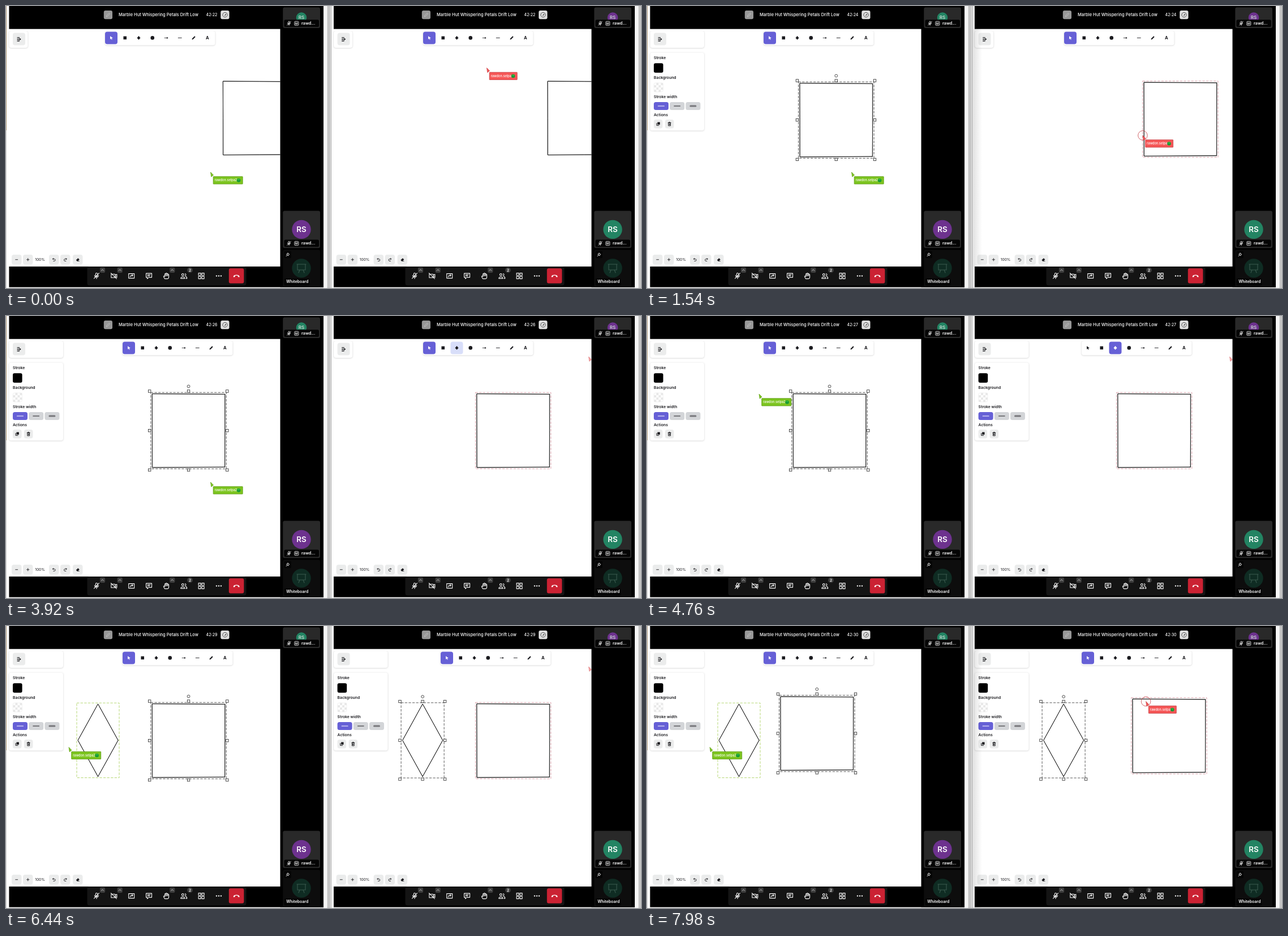
Recreate the animation shown at these times as an HTML page with a canvas. Size 1122 by 499 pixels, loop 8000 ms.

```html
<!DOCTYPE html>
<html lang="en">
<head>
<meta charset="utf-8">
<title>Shared whiteboard</title>
<style>
html, body { margin: 0; width: 100%; height: 100%; overflow: hidden; background: #fff; }
canvas { display: block; width: 1122px; height: 499px; }
</style>
</head>
<body>
<canvas id="stage"></canvas>
<script>
const W = 1122, H = 499, LOOP = 8000, STEP = 70, LAG = 140;
const canvas = document.getElementById('stage');
const ctx = canvas.getContext('2d');
const dpr = window.devicePixelRatio || 1;
canvas.width = W * dpr;
canvas.height = H * dpr;

const FONT = 'Inter, "Open Sans", sans-serif';
const TITLE = 'Marble Hut Whispering Petals Drift Low';
const USER = 'rawdon.selpa';
const INK = '#1b1b1f', ACCENT = '#6660d6', SOFT = '#ebecec';
const RED = { fill: '#f55656', edge: '#c63f46' };
const GREEN = { fill: '#7cc41f', edge: '#5f9c17' };
const PURPLE_AVATAR = '#6d328e', GREEN_AVATAR = '#238463';
const TICKS = [210, 1190, 2200, 3220, 4270, 5300, 6230, 7210];

// Two browser windows: offsets of board, centred bars and tiles
const LEFT = { ox: 0, bar: 0, tile: 0, edge: 484.5, end: 561, big: PURPLE_AVATAR, small: GREEN_AVATAR };
const RIGHT = { ox: 573.6, bar: 562, tile: 550, edge: 1034.5, end: 1111, big: GREEN_AVATAR, small: PURPLE_AVATAR };

const RECT_W = 128.5, RECT_H = 130.5;
const RECT_PATH = [
  [0, 383.5, 133], [770, 383.5, 133], [1400, 304.5, 135], [1540, 270, 136.5],
  [1680, 232, 137], [1960, 300, 136], [2240, 258.3, 137.5], [7350, 258.3, 137.5],
  [7630, 310, 131], [7840, 284.5, 129], [7980, 236, 124.8]
];
const RED_PATH = [
  [0, 849.5, 109.5], [350, 955, 227.5], [2450, 829.8, 232], [2520, 835, 232],
  [2730, 841, 187], [2940, 1029.5, 72], [7210, 1029.5, 72], [7420, 855.8, 142.5]
];
const GREEN_PATH = [
  [0, 361.5, 294], [4550, 361.5, 294], [4690, 198, 138], [4830, 198, 138],
  [5320, 127, 266.5], [6160, 127, 266.5], [6440, 111, 214.5]
];

function along(path, t) {
  let i = path.findIndex(k => k[0] > t);
  if (i < 0) i = path.length;
  const a = path[Math.max(0, i - 1)], b = path[Math.min(i, path.length - 1)];
  const p = b[0] > a[0] ? Math.max(0, (t - a[0]) / (b[0] - a[0])) : 0;
  return { x: a[1] + (b[1] - a[1]) * p, y: a[2] + (b[2] - a[2]) * p };
}

const between = (t, a, b) => t >= a && t < b;

// ---- drawing helpers ----
function fill(x, y, w, h, color) {
  ctx.fillStyle = color;
  ctx.fillRect(x, y, w, h);
}

function box(x, y, w, h, r, color, stroke) {
  ctx.beginPath();
  ctx.roundRect(x, y, w, h, r);
  if (color) { ctx.fillStyle = color; ctx.fill(); }
  if (stroke) { ctx.strokeStyle = stroke; ctx.lineWidth = 0.8; ctx.stroke(); }
}

function disc(x, y, r, color, stroke) {
  ctx.beginPath();
  ctx.arc(x, y, r, 0, Math.PI * 2);
  if (color) { ctx.fillStyle = color; ctx.fill(); }
  if (stroke) { ctx.strokeStyle = stroke; ctx.lineWidth = 0.8; ctx.stroke(); }
}

function text(s, x, y, size, weight, color, align = 'left') {
  ctx.font = `${weight} ${size}px ${FONT}`;
  ctx.textAlign = align;
  ctx.textBaseline = 'middle';
  ctx.fillStyle = color;
  ctx.fillText(s, x, y);
}

// SVG path centred on x, y; no line width means filled
function icon(d, x, y, color, width) {
  ctx.save();
  ctx.translate(x, y);
  const p = new Path2D(d);
  if (width) {
    ctx.strokeStyle = color;
    ctx.lineWidth = width;
    ctx.lineCap = ctx.lineJoin = 'round';
    ctx.stroke(p);
  } else {
    ctx.fillStyle = color;
    ctx.fill(p);
  }
  ctx.restore();
}

function island(x, y, w, h) {
  ctx.save();
  ctx.shadowColor = 'rgba(0,0,0,.2)';
  ctx.shadowBlur = 2.5;
  ctx.shadowOffsetY = 0.5;
  box(x, y, w, h, 4, '#fff');
  ctx.restore();
}

const ICON = {
  mic: 'M-1.6-3.6a1.6 1.6 0 0 1 3.2 0v3a1.6 1.6 0 0 1-3.2 0zM-3.4-1a3.4 3.4 0 0 0 6.8 0M0 2.6V5M-4.5 4.5L4.5-5',
  cam: 'M-5-3.2H2V3.2H-5zM2-.8L5-2.8V2.8L2 .8M-5.5-5L4.5 5',
  share: 'M-5-4H5V4H-5zM-2.5 1.8C-2-.8 0-1 2.5-1M1-2.6L2.6-1 1 .6',
  chat: 'M-5-4.5H5V2.5H0L-3 5V2.5H-5zM-2.5-2H2.5M-2.5 0H1',
  hand: 'M-3 5C-4 3-5.5 1.5-5 .6S-3.5.2-2.8 1.4V-3C-2.8-4.4-1-4.4-1-3V-4C-1-5.4.8-5.4.8-4V-3.4C.8-4.7 2.5-4.7 2.5-3.4V-2C2.5-3.2 4.2-3.2 4.2-2V2C4.2 4 3 5 2 5zM-1-3V0M.8-3.5V0M2.5-2V0',
  people: 'M-3.8-2.2a1.9 1.9 0 1 0 3.8 0a1.9 1.9 0 1 0-3.8 0M-5.5 4.5C-5.5 .6 1.7 .6 1.7 4.5zM2-3.9a1.7 1.7 0 0 1 0 3.4M3 1C5 1.4 5.5 3 5.5 4.5H3.7',
  grid: 'M-5-5H-.9V-.9H-5zM.9-5H5V-.9H.9zM-5 .9H-.9V5H-5zM.9 .9H5V5H.9z',
  phone: 'M-5.4 1.6C-6-3 6-3 5.4 1.6C5.2 2.6 2.6 2 2.4 1.2V-.3C1-.8-1-.8-2.4-.3V1.2C-2.6 2-5.2 2.6-5.4 1.6z',
  pen: 'M-3 3L-2.5 1 1.7-3.2 3.2-1.7-1 2.5z',
  caret: 'M-2 .9L0-1.1 2 .9',
  undo: 'M-1-2.6L-2.4-1.2-1 .2M-2.3-1.2H.4a1.9 1.9 0 0 1 0 3.8H-1',
  redo: 'M1-2.6L2.4-1.2 1 .2M2.3-1.2H-.4a1.9 1.9 0 0 0 0 3.8H1',
  eraser: 'M-3 .7L.4-2.6 3-.2 .4 2.4H-1.5zM-1.5 2.2H3V2.9H-1.5z',
  menu: 'M-3.4-3.6H1V-2.2H-3.4zM-3.4-.7H.2V.7H-3.4zM-3.4 2.2H1V3.6H-3.4zM.7-2.2L3.8 0 .7 2.2z',
  trash: 'M-2.5-2.2H2.5M-1-2.2V-3.2H1V-2.2M-1.9-2V3.3H1.9V-2M-.6-.8V2M.6-.8V2',
  copyFront: 'M-1.2-3.2H3.2V1.2H-1.2z',
  copyBack: 'M-2.6-1.2V2.7H1.4',
  pin: 'M.4-2.9L2.9-.4 1.3 .4 .9 2.1-2.1-.9-.4-1.3zM-.6 .6L-2.8 2.8',
  board: 'M-8-7H8M-7-7V3H7V-7M-3 3L-5 8M3 3L5 8'
};

// Hand-drawn outline: two slightly different passes
function rough(pts) {
  ctx.strokeStyle = '#000';
  ctx.lineWidth = 0.7;
  for (let pass = 0; pass < 2; pass++) {
    ctx.beginPath();
    pts.forEach(([x, y], i) => {
      const [u, v] = pts[(i + 1) % pts.length];
      const k = pass ? 0.6 : -0.2, s = i % 2 ? 1 : -1;
      ctx.moveTo(x + k * 0.6, y - k * s * 0.6);
      ctx.quadraticCurveTo((x + u) / 2 + k * 0.6, (y + v) / 2 + k * 0.5, u - k * s * 0.5, v + k * 0.5);
    });
    ctx.stroke();
  }
}

function dashed(x, y, w, h, color) {
  ctx.save();
  ctx.setLineDash([4.4, 2.2]);
  ctx.strokeStyle = color;
  ctx.lineWidth = 0.8;
  ctx.strokeRect(x, y, w, h);
  ctx.restore();
}

function selection(x, y, w, h) {
  dashed(x - 2.5, y - 2.2, w + 5, h + 4.6, '#333');
  const xs = [x - 4.6, x + w / 2, x + w + 4], ys = [y - 4.5, y + h / 2, y + h + 4.5];
  ctx.lineWidth = 0.8;
  ctx.strokeStyle = '#222';
  for (let i = 0; i < 9; i++) {
    if (i === 4) continue;
    const hx = xs[i % 3], hy = ys[Math.floor(i / 3)];
    fill(hx - 2.2, hy - 2.2, 4.4, 4.4, '#fff');
    ctx.strokeRect(hx - 2.2, hy - 2.2, 4.4, 4.4);
  }
  disc(xs[1], y - 13, 2.4, '#fff', '#222');
}

function drawRect(x, y) {
  rough([[x, y], [x + RECT_W, y + 0.8], [x + RECT_W, y + RECT_H - 0.8], [x, y + RECT_H]]);
}

function diamondBox(t) {
  const c = along(GREEN_PATH, Math.min(t, 5320));
  return { x: c.x, y: 138, w: 198 - c.x, h: c.y - 138 };
}

function drawDiamond({ x, y, w, h }, ox) {
  x += ox;
  rough([[x + w / 2, y], [x + w, y + h / 2], [x + w / 2, y + h], [x, y + h / 2]]);
}

function pointer(p, look, name, width, pressed, faded) {
  ctx.save();
  if (faded) ctx.globalAlpha = 0.55;
  if (pressed) disc(p.x, p.y, 8.3, null, look.edge);
  ctx.translate(p.x, p.y);
  ctx.beginPath();
  ctx.moveTo(0, 0);
  ctx.lineTo(1.2, 8.2);
  ctx.lineTo(5, 5.2);
  ctx.closePath();
  ctx.fillStyle = look.fill;
  ctx.fill();
  ctx.strokeStyle = look.edge;
  ctx.lineWidth = 0.7;
  ctx.lineJoin = 'round';
  ctx.stroke();
  if (!faded) {
    box(4.7, 7.8, width, 13.2, 0.5, look.fill, look.edge);
    text(name, 7.2, 14.6, 5.6, 500, '#fff');
    disc(width - 2.4, 14.5, 3.3, '#169a36');
    fill(width - 4.3, 12.6, 3.8, 1.2, '#3fca45');
  }
  ctx.restore();
}

// ---- window parts ----
function toolbar(x, active, hover) {
  island(x, 44, 194.5, 25.5);
  const at = i => x + 11 + (i ? 24.25 * i : 0);
  if (hover >= 0) box(at(hover) - 11, 45.5, 22, 22, 4, '#d8def9');
  box(at(active) - 11, 45.5, 22, 22, 4, ACCENT);
  const tone = i => i === active ? '#fff' : INK;
  const shapes = [
    'M-2-3.2L2.8 .3 .6 .8 1.8 3 .9 3.4-.3 1.3-1.9 2.7z', 'M-2.8-2.8H2.8V2.8H-2.8z',
    'M0-3.4L3 0 0 3.4-3 0z', 'M-3.3 0a3.3 3.3 0 1 0 6.6 0a3.3 3.3 0 1 0-6.6 0',
    'M-3.3-.4H1.2V-1.9L3.5 0 1.2 1.9V.4H-3.3z', 'M-3.4-.45H3.4V.45H-3.4z', ICON.pen
  ];
  shapes.forEach((d, i) => icon(d, at(i), 56.4, tone(i)));
  text('A', at(7), 56.8, 7.6, 700, INK, 'center');
}

function panel(ox) {
  island(ox + 5.5, 82.5, 95.5, 138);
  [['Stroke', 92], ['Background', 127], ['Stroke width', 161.3], ['Actions', 193]]
    .forEach(([s, y]) => text(s, ox + 12, y, 6.8, 600, INK));
  box(ox + 12, 101.3, 16.6, 16.6, 3, '#000');
  box(ox + 12.3, 136, 16, 16, 3, '#fff', '#eee');
  for (let i = 0; i < 16; i++) {
    const r = Math.floor(i / 4), c = i % 4;
    if ((r + c) % 2) fill(ox + 12.5 + c * 4, 136.2 + r * 4, 3.9, 3.9, '#e8e8e8');
  }
  for (let i = 0; i < 3; i++) {
    const x = ox + 12 + i * 28.2, h = 1 + i;
    box(x, 170, 26, 14, 3.5, i ? '#d3d5d8' : ACCENT);
    box(x + 7, 177 - h / 2, 12, h, h / 2, i ? '#77777b' : '#fff');
  }
  box(ox + 12, 201, 15.5, 15.5, 3.5, SOFT);
  box(ox + 32, 201, 15.5, 15.5, 3.5, SOFT);
  icon(ICON.copyFront, ox + 19.7, 208.7, INK);
  icon(ICON.copyBack, ox + 19.7, 208.7, INK, 1);
  icon(ICON.trash, ox + 39.7, 208.7, INK, 0.9);
}

function boardTools(win, open, active, hover) {
  const { ox } = win;
  island(ox + 5.5, 44, open ? 95.5 : 33, 30);
  box(ox + 12, 47.5, 22, 22, 4, SOFT);
  icon(ICON.menu, ox + 23, 58.8, INK);
  if (open) panel(ox);
  toolbar(win.bar + 175 + (open ? 31 : 0), active, hover);

  [10, 30, 76, 96, 118].forEach(x => box(ox + x, 440, 17.5, 17.5, 4, SOFT));
  icon('M-2 0H2', ox + 18.7, 448.8, INK, 0.9);
  icon('M-2.2 0H2.2M0-2.2V2.2', ox + 38.7, 448.8, INK, 0.9);
  text('100%', ox + 60, 449, 6.6, 400, INK, 'center');
  icon(ICON.undo, ox + 84.8, 448.8, INK, 0.9);
  icon(ICON.redo, ox + 104.8, 448.8, INK, 0.9);
  icon(ICON.eraser, ox + 126.8, 448.8, INK);
}

function header(bar, time) {
  box(bar + 172.8, 8, 15.2, 15.2, 3, '#979797');
  icon(ICON.pen, bar + 180.5, 15.5, '#c6c6c6', 0.8);
  text(TITLE, bar + 199, 15.8, 7.5, 500, '#fff');
  text(time, bar + 353.6, 15.8, 7, 500, '#fff');
  box(bar + 379.3, 8, 15.2, 15.2, 3, '#e0e0e0');
  disc(bar + 387, 15.6, 4.2, null, '#333');
  icon('M0 1.2L1.8-1.4', bar + 386.7, 15.8, '#333', 1.1);
}

function callBar(bar) {
  box(bar + 143.5, 461, 281, 33.5, 4, '#141414');
  ['mic', 'cam', 'share', 'chat', 'hand', 'people', 'grid'].forEach((name, i) =>
    icon(ICON[name], bar + 160 + i * 30.85, 477.6, '#fff', 1.05));
  [-4, 0, 4].forEach(d => disc(bar + 376 + d, 477.6, 1.2, '#fff'));
  [170.5, 201.2, 293.8].forEach(x => {
    box(bar + x - 4.6, 462.7, 9.2, 9.2, 2, '#3d3d3d');
    icon(ICON.caret, bar + x, 467.4, '#ddd', 0.9);
  });
  disc(bar + 325, 467.4, 4.9, '#3d3d3d');
  text('2', bar + 325, 467.7, 6.6, 600, '#fff', 'center');
  box(bar + 393.8, 464.2, 26.6, 26.6, 3, '#cb2233');
  icon(ICON.phone, bar + 407.2, 477.6, '#fff');
}

function nameTag(x, y) {
  box(x + 491.5, y, 61.5, 12.7, 2.5, '#050505');
  ctx.save();
  ctx.translate(x + 500, y + 6.5);
  ctx.scale(0.72, 0.72);
  icon(ICON.mic, 0, 0, '#fff', 1.1);
  ctx.restore();
  box(x + 509.8, y + 3, 7, 7, 1.2, null, '#fff');
  text('M', x + 513.3, y + 6.8, 5, 600, '#fff', 'center');
  text(USER.slice(0, 4) + '...', x + 522, y + 6.3, 7.2, 600, '#fff');
}

function tiles({ tile: x, big, small }) {
  box(x + 489.3, 2.5, 65.7, 36.5, 3, '#292929');
  disc(x + 522, 20.5, 9.3, small);
  text('RS', x + 522, 20.8, 8, 600, '#c9d6d0', 'center');
  nameTag(x, 24.3);

  box(x + 489.3, 362.5, 65.7, 65.7, 3, '#292929');
  disc(x + 522, 395.4, 16.7, big);
  text('RS', x + 522, 396, 13.4, 600, '#fff', 'center');
  nameTag(x, 413.6);

  box(x + 489.3, 431.6, 65.7, 65.7, 3, '#0d0d0d');
  disc(x + 522, 464, 16.7, '#0f2c23');
  icon(ICON.board, x + 522, 464, '#3b5a4f', 1.1);
  box(x + 491.5, 433.8, 12.5, 12.5, 2.5, '#050505');
  icon(ICON.pin, x + 497.8, 440, '#fff', 0.9);
  box(x + 491.5, 482, 45, 12.7, 2.5, '#050505');
  text('Whiteboard', x + 495.3, 488.4, 6.9, 600, '#fff');
}

function chrome(win, time) {
  const x = win.ox + 5.4;
  fill(x, 0, win.end - x, 40.7, '#000');
  fill(x, 461, win.end - x, 36.6, '#000');
  fill(win.edge, 0, win.end - win.edge, 497.6, '#000');
  header(win.bar, time);
  callBar(win.bar);
  tiles(win);
}

function clipBoard({ ox, edge }) {
  ctx.beginPath();
  ctx.rect(ox, 41, edge - ox, 420);
  ctx.clip();
}

const clock = t => '42:' + (22 + TICKS.filter(k => t >= k).length);

function leftBoard(t) {
  const r = along(RECT_PATH, t);
  drawRect(r.x, r.y);
  if (t >= 700) selection(r.x, r.y, RECT_W, RECT_H);
  if (t >= 4900) drawDiamond(diamondBox(t), 0);
  if (t >= 5460) dashed(125, 136.2, 75, 132.3, '#a5cf55');
}

function rightBoard(t) {
  const r = along(RECT_PATH, t - LAG), x = r.x + RIGHT.ox;
  drawRect(x, r.y);
  if (t >= 840) dashed(x - 2.4, r.y - 2.2, RECT_W + 4.8, RECT_H + 4.5, '#d48f9a');
  if (t >= 4830) {
    const d = diamondBox(t + STEP);
    drawDiamond(d, RIGHT.ox);
    if (t >= 5250) selection(d.x + RIGHT.ox, d.y, d.w, d.h);
  }
  let p = along(RED_PATH, t);
  if (between(t, 770, 2450)) p = { x: x - 2.2, y: r.y + 94 };
  if (t >= 7490) p = { x: x + 23.5, y: r.y + 4.5 };
  const pressed = between(t, 840, 2380) || t >= 7490;
  pointer(p, RED, USER, 49, pressed, p.x > 1026);
}

function draw(t) {
  ctx.setTransform(dpr, 0, 0, dpr, 0, 0);
  fill(0, 0, W, H, '#fff');

  ctx.save();
  clipBoard(LEFT);
  leftBoard(t);
  ctx.restore();
  boardTools(LEFT, t >= 700, 0, -1);
  pointer(along(GREEN_PATH, t), GREEN, USER + '2', 52, between(t, 4830, 5400), false);

  ctx.save();
  clipBoard(RIGHT);
  rightBoard(t);
  ctx.restore();
  const open = t >= 4060;
  boardTools(RIGHT, open, between(t, 4060, 5250) ? 2 : 0, between(t, 3920, 4060) ? 2 : -1);

  // the focused left window casts a shadow on its neighbour
  if (between(t, 560, 3570) || t >= 6790) {
    const g = ctx.createLinearGradient(575, 0, 592, 0);
    g.addColorStop(0, 'rgba(0,0,0,.12)');
    g.addColorStop(1, 'rgba(0,0,0,0)');
    fill(575, 0, 17, H, g);
  }

  chrome(LEFT, clock(t));
  chrome(RIGHT, clock(t - STEP));

  // window edges and scrollbars
  fill(0, 0, 1, 220, '#b09a78');
  fill(0, 220, 1, 279, '#d5d5d5');
  fill(561, 0, 6.5, H, '#f7f7f7');
  fill(567.5, 0, 5.5, H, '#c4c4c4');
  fill(573, 0, 1, H, '#eee');
  fill(574, 0, 1, H, '#a4a4a4');
  fill(1111, 0, 6.5, H, '#f7f7f7');
  fill(1117.5, 0, 4.5, H, '#c4c4c4');
}

const start = performance.now();
function frame() {
  const t = (performance.now() - start) % LOOP;
  draw(Math.floor(t / STEP) * STEP);
  requestAnimationFrame(frame);
}
frame();
</script>
</body>
</html>
```
